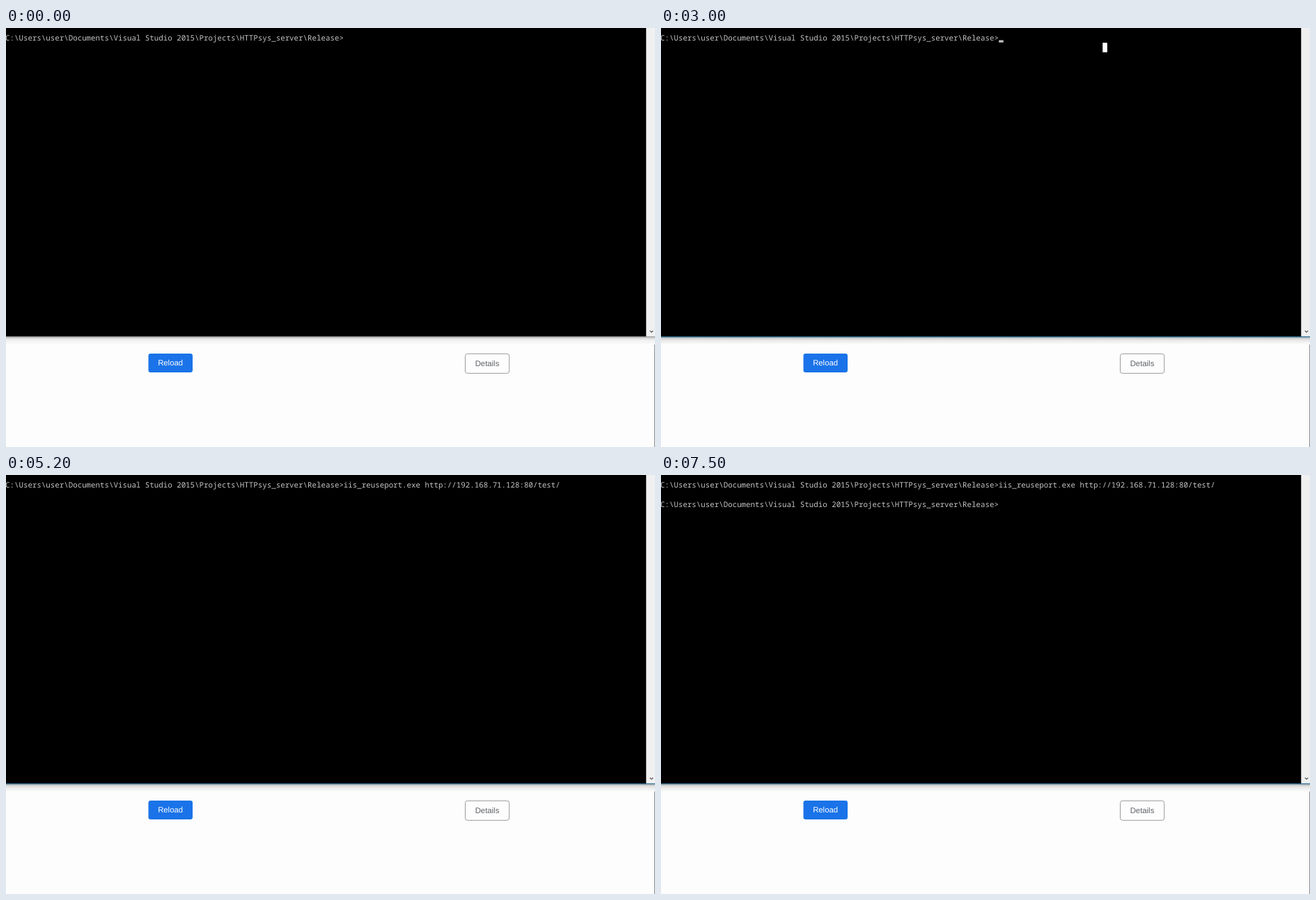
An HTML page that plays this animation: 932x601 px, repeating every 8 s.

```html
<!DOCTYPE html>
<html lang="en">
<head>
<meta charset="utf-8">
<title>Console and page</title>
<style>
  html, body { margin: 0; width: 100%; height: 100%; overflow: hidden; background: #fdfdfd; }
  svg { display: block; }
  text { text-rendering: geometricPrecision; }
  .console { font: 10.8px "Noto Sans Mono", monospace; fill: #c4c4c4; }
  .button { font: 11.34px "Liberation Sans", sans-serif; text-anchor: middle; }
</style>
</head>
<body>
<svg width="932" height="601" viewBox="0 0 932 601">
  <defs>
    <linearGradient id="softShadow" x2="0" y2="1">
      <stop stop-color="#c4c4c4"/><stop offset=".4" stop-color="#efefef"/><stop offset="1" stop-color="#fdfdfd"/>
    </linearGradient>
    <linearGradient id="deepShadow" x2="0" y2="1">
      <stop stop-color="#b4b4b4"/><stop offset=".4" stop-color="#e6e6e6"/><stop offset="1" stop-color="#fdfdfd"/>
    </linearGradient>
  </defs>

  <rect width="932" height="601" fill="#fdfdfd"/>
  <rect x="931" y="443" width="1" height="158" fill="#8c8c8c"/>
  <rect id="shadow" y="443" width="932" height="11"/>
  <rect id="edge" y="442" width="932" height="1.6"/>

  <rect width="919.5" height="442.3"/>
  <rect x="919.5" width="12.5" height="442.3" fill="#f0f0f0"/>
  <path d="M924.7 434.2l2.3 2.3 2.3-2.3" fill="none" stroke="#505050" stroke-width="1.2"/>

  <g class="console">
    <text id="line1" x="-1" y="18"></text>
    <text id="line2" x="-1" y="45.7"></text>
    <rect id="cursor" y="17.5" width="6.5" height="3.2"/>
    <rect id="pointer" x="634.2" y="21.2" width="6.6" height="13.6" fill="#fff"/>
  </g>

  <g class="button">
    <rect x="204.5" y="467" width="63.5" height="27" rx="3.2" fill="#1a73e8"/>
    <text x="236.1" y="484.4" fill="#fff">Reload</text>
    <rect x="659.5" y="467.3" width="63.2" height="28" rx="3.2" fill="#fdfdfd" stroke="#9a9a9a"/>
    <text x="691" y="485.4" fill="#5f6368">Details</text>
  </g>
</svg>
<script>
const LOOP = 8000;
const PROMPT = String.raw`C:\Users\user\Documents\Visual Studio 2015\Projects\HTTPsys_server\Release>`;
const COMMAND = "iis_reuseport.exe http://192.168.71.128:80/test/";
const FOCUS = 1000, POINTER = 2700, PASTE = 4400, DONE = 7500;
// Times at which the cursor switches on, off, on, off ...
const BLINKS = [1300, 1700, 2100, 2500, 3000, 3400, 3900, 4300,
                4800, 5200, 5700, 6000, 6500, 6800, 7300, 7400];

const el = id => document.getElementById(id);
const set = (id, name, value) => el(id).setAttribute(name, value);
const show = (id, visible) => set(id, "visibility", visible ? "visible" : "hidden");

function draw(t) {
  const focused = t >= FOCUS, pasted = t >= PASTE;
  set("edge", "fill", focused ? "#2d7098" : "#a0a0a0");
  set("shadow", "fill", `url(#${focused ? "deep" : "soft"}Shadow)`);
  el("line1").textContent = PROMPT + (pasted ? COMMAND : "");
  el("line2").textContent = t >= DONE ? PROMPT : "";
  set("cursor", "x", pasted ? 796.2 : 485.2);
  show("cursor", BLINKS.filter(time => time <= t).length % 2);
  show("pointer", t >= POINTER && !pasted);
}

const start = performance.now();
function tick() {
  draw((performance.now() - start) % LOOP);
  requestAnimationFrame(tick);
}
tick();
</script>
</body>
</html>
```
